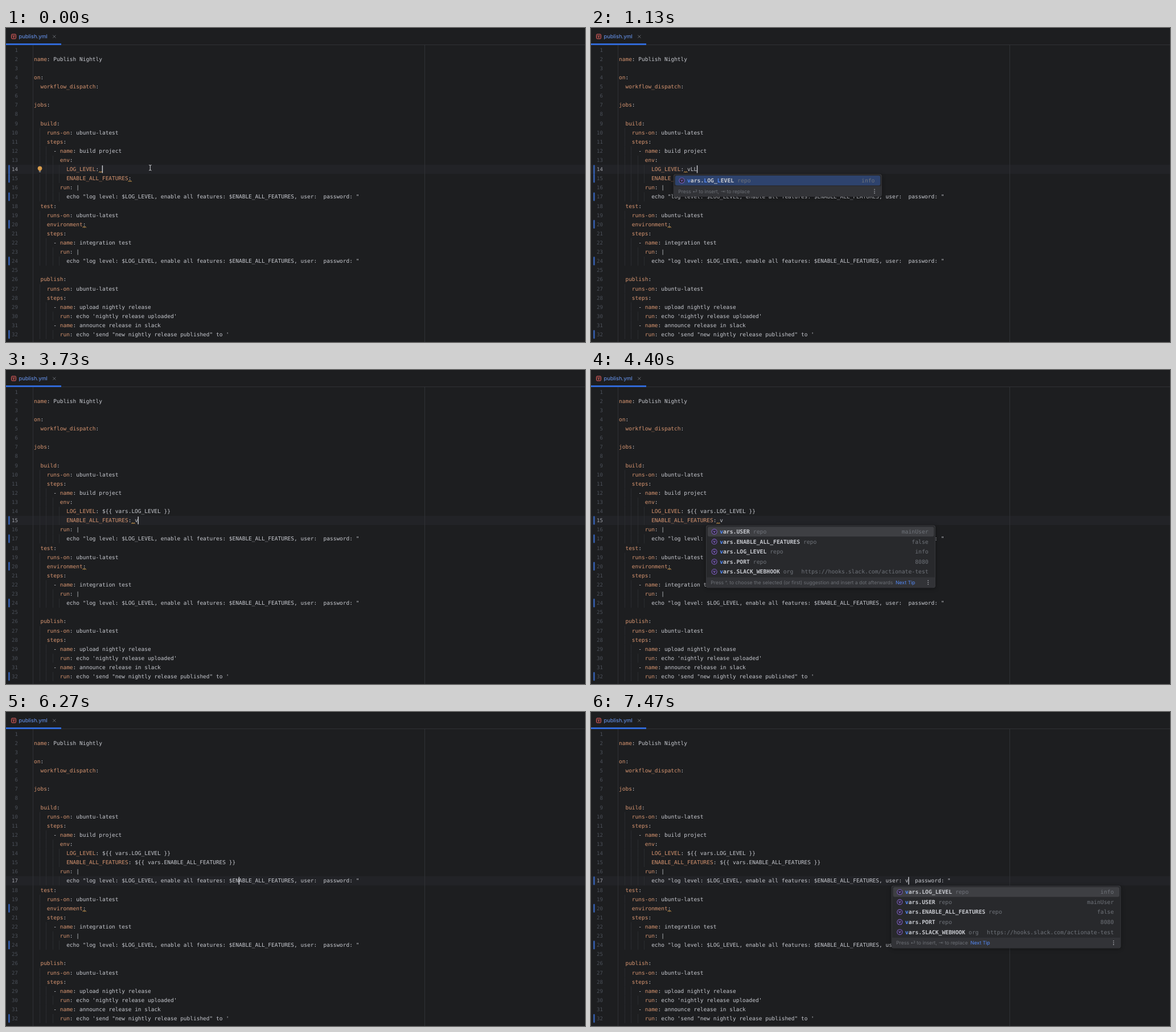
Write an HTML page with a canvas that moves like this. It is 1017 by 551 pixels and loops after 8 s.

```html
<!DOCTYPE html>
<html lang="en">
<head>
<meta charset="utf-8">
<title>publish.yml</title>
<style>
  html, body { margin: 0; width: 100%; height: 100%; overflow: hidden; background: #1d1e20; }
  canvas { display: block; }
</style>
</head>
<body>
<canvas id="stage" width="1017" height="551"></canvas>
<script>
const W = 1017, H = 551, LOOP = 8000;
const ctx = document.getElementById('stage').getContext('2d');
ctx.textRendering = 'geometricPrecision';

const MONO = '"DejaVu Sans Mono", "Noto Sans Mono", monospace';
const SANS = 'Inter, "DejaVu Sans", sans-serif';
const CODE = '9.49px ' + MONO;
const ITEM = '9.75px ' + MONO;
const CW = 5.714, ITEM_CW = 5.87, LINE_H = 16.11, ROW_H = 17.55;

const C = {
  bg: '#1d1e20', row: '#222327', rule: '#2f3135', text: '#c6c8ce', key: '#d6946f',
  num: '#4b5059', numOn: '#a1a3ab', mark: '#345ba6', warn: '#d9a04e', caret: '#ced0d6',
  popup: '#28292c', edge: '#3e3f43', foot: '#323337', dim: '#6f737a', hint: '#6c6f75',
  blue: '#548af7', pick: '#2e436e', purple: '#8f68dd', bulb: '#d99c4c'
};

const colX = col => 49 + col * CW;
const lineY = n => 38.5 + (n - 1) * LINE_H;

// Document text; the edited values come from the state.
const source = s => {
  const echo = user => '          echo "log level: $LOG_LEVEL, enable all features: ' +
    '$ENABLE_ALL_FEATURES, user:' + user + '  password: "';
  return [
    '', 'name: Publish Nightly', '', 'on:', '  workflow_dispatch:', '', 'jobs:', '',
    '  build:',
    '    runs-on: ubuntu-latest',
    '    steps:',
    '      - name: build project',
    '        env:',
    '          LOG_LEVEL:' + s.level,
    '          ENABLE_ALL_FEATURES:' + s.features,
    '        run: |',
    echo(s.user),
    '  test:',
    '    runs-on: ubuntu-latest',
    '    environment:',
    '    steps:',
    '      - name: integration test',
    '        run: |',
    echo(''),
    '',
    '  publish:',
    '    runs-on: ubuntu-latest',
    '    steps:',
    '      - name: upload nightly release',
    "        run: echo 'nightly release uploaded'",
    '      - name: announce release in slack',
    "        run: echo 'send \"new nightly release published\" to '"
  ];
};

const vars = {
  USER: ['repo', 'mainUser'],
  ENABLE_ALL_FEATURES: ['repo', 'false'],
  LOG_LEVEL: ['repo', 'info'],
  PORT: ['repo', '8080'],
  SLACK_WEBHOOK: ['org', 'https://hooks.slack.com/actionate-test']
};
const ALL = Object.keys(vars);
const RECENT = ['LOG_LEVEL', ...ALL.filter(n => n !== 'LOG_LEVEL')];
const INSERT = 'Press ⏎ to insert, ⇥ to replace';
const DOT = 'Press ^. to choose the selected (or first) suggestion and insert a dot afterwards';

const popup = (line, col, typed, names, more) =>
  ({ line, col, typed, names, hint: INSERT, tip: true, width: 403, ...more });
const first = { tip: false, width: 366, pick: C.pick };

// Each step changes part of the state and lasts until the next one.
const steps = [
  [0, { line: 14, col: 21, caret: true, level: ' ', features: '', user: '', warn14: 20, warn15: 29,
        bulb: true, mouse: true, popup: null, marks: [14, 15, 17, 20, 24, 32] }],
  [100, { level: ' v', col: 22, bulb: false, mouse: false, popup: popup(14, 21, 'v', ALL, first) }],
  [900, { level: ' vL', col: 23 }],
  [930, { popup: popup(14, 21, 'vL', ['LOG_LEVEL'], first) }],
  [1130, { level: ' vLL', col: 24, popup: popup(14, 21, 'vLL', ['LOG_LEVEL'], first) }],
  [1500, { level: ' ${{ vars.LOG_LEVEL }}', col: 42, popup: null, marks: [15, 17, 20, 24, 32] }],
  [1800, { warn14: 0 }],
  [2330, { bulb: true }],
  [2400, { caret: false }],
  [2670, { line: 15, col: 30, caret: true, bulb: false }],
  [3130, { features: ' ', col: 31 }],
  [3470, { warn15: 30 }],
  [3730, { features: ' v', col: 32 }],
  [3770, { popup: popup(15, 31, 'v', ALL, { hint: DOT }) }],
  [4400, { caret: false }],
  [4670, { features: ' v.', col: 33, caret: true }],
  [4700, { popup: popup(15, 31, 'v.', ALL) }],
  [5000, { features: ' v.E', col: 34 }],
  [5070, { popup: popup(15, 31, 'v.E', ['ENABLE_ALL_FEATURES']) }],
  [5370, { features: ' ${{ vars.ENABLE_ALL_FEATURES }}', col: 62, popup: null }],
  [5400, { marks: [17, 20, 24, 32] }],
  [5700, { warn15: 0 }],
  [6000, { line: 16, col: 14 }],
  [6070, { line: 17, col: 62, marks: [20, 24, 32] }],
  [6270, { col: 63 }],
  [6600, { marks: [17, 20, 24, 32] }],
  [6870, { col: 86 }],
  [6900, { col: 87 }],
  [7070, { user: ' ', col: 88 }],
  [7470, { user: ' v', col: 89, popup: popup(17, 88, 'v', RECENT) }]
];

function stateAt(t) {
  const s = Object.assign({}, ...steps.filter(([at]) => at <= t).map(step => step[1]));
  // Held arrow key: the caret runs to the right.
  if (t >= 6400 && t < 6870) {
    const held = Math.min(400, Math.floor((t - 6400) / 33.3 + 0.01) * 33.4);
    s.col = 64 + Math.round(held / 400 * 21);
  }
  return s;
}

function rect(x, y, w, h, color) {
  ctx.fillStyle = color;
  ctx.fillRect(x, y, w, h);
}

function round(x, y, w, h, r, color) {
  ctx.beginPath();
  ctx.roundRect(x, y, w, h, r);
  ctx.fillStyle = color;
  ctx.fill();
}

function path(points, color, width = 1) {
  ctx.beginPath();
  points.forEach(([x, y]) => ctx.lineTo(x, y));
  ctx.strokeStyle = color;
  ctx.lineWidth = width;
  ctx.stroke();
}

function disc(x, y, r, color) {
  ctx.beginPath();
  ctx.arc(x, y, r, 0, Math.PI * 2);
  ctx.fillStyle = color;
  ctx.fill();
}

function text(str, x, y, color, font, align = 'left') {
  ctx.font = font;
  ctx.textAlign = align;
  ctx.fillStyle = color;
  ctx.fillText(str, x, y);
}

function drawTab() {
  rect(0, 0, W, 1, '#17181a');
  rect(0, 29, W, 1, C.rule);
  rect(0, 27, 97, 3, '#3069d6');
  ctx.beginPath();
  ctx.roundRect(9.5, 10.9, 8, 8, 1.5);
  ctx.fillStyle = '#402929';
  ctx.fill();
  ctx.strokeStyle = '#db5c5c';
  ctx.lineWidth = 1;
  ctx.stroke();
  path([[11.7, 12.8], [13.5, 15.2], [15.3, 12.8]], '#db5c5c');
  path([[13.5, 15.2], [13.5, 17.2]], '#db5c5c');
  text('publish.yml', 22.5, 18.2, '#6b9bfa', '9.35px ' + SANS);
  path([[82.3, 12.5], [87.3, 17.5]], C.dim, 0.9);
  path([[87.3, 12.5], [82.3, 17.5]], C.dim, 0.9);
}

function drawCode(line, n) {
  const y = lineY(n), base = y + 3.2;
  const indent = line.search(/\S/);
  for (let c = 2; c < indent; c += 2) rect(Math.round(colX(c) - 1.4), y - LINE_H / 2, 1, LINE_H, '#2a2c2f');
  const [, lead, key, rest] = line.match(/^(\s*(?:- )?)([\w-]+(?=:))?(.*)$/);
  const put = (str, col, color) => {
    for (const m of str.matchAll(/\S+/g)) text(m[0], colX(col + m.index), base, color, CODE);
  };
  put(lead, 0, C.text);
  if (key) put(key, lead.length, C.key);
  put(rest, lead.length + (key || '').length, C.text);
}

function squiggle(n, col) {
  const y = lineY(n) + 4.8, pts = [];
  for (let i = 0; i <= 4; i++) pts.push([colX(col) + i * 1.5, y + (i % 2 ? -1 : 1)]);
  path(pts, C.warn, 1);
}

function drawMarks(marks) {
  marks.forEach(n => {
    const joined = marks.includes(n + 1), after = marks.includes(n - 1);
    const top = after ? 0 : 1.5, end = joined ? 0 : 1.5;
    round(4, lineY(n) - 7.8, 2.8, LINE_H - (joined ? 0 : 0.8), [top, top, end, end], C.mark);
  });
}

function drawBulb(y) {
  disc(59.5, y - 1.6, 3.8, C.bulb);
  rect(57.7, y + 1.5, 3.6, 1.4, C.bulb);
  rect(57.9, y + 3.7, 3.2, 1.2, '#a5a7ad');
}

function drawMouse(x, y) {
  const bar = '#d5d6da';
  path([[x, y - 4.2], [x, y + 4.2]], bar);
  for (const d of [-1, 1]) {
    path([[x - 2.2, y + d * 4.9], [x, y + d * 4], [x + 2.2, y + d * 4.9]], bar);
  }
}

function drawItem(name, p, x, right, y) {
  const label = 'vars.' + name, [scope, value] = vars[name];
  const icon = x - 9.5;
  disc(icon, y, 5, C.purple);
  disc(icon, y, 4.1, '#2b2835');
  path([[icon - 1.6, y - 1.8], [icon, y + 1.8], [icon + 1.6, y - 1.8]], C.purple);

  // Typed letters light up in order.
  let hit = 0;
  [...label].forEach((ch, i) => {
    const on = ch === p.typed[hit];
    if (on) hit++;
    text(ch, x + i * ITEM_CW, y + 3.4, on ? C.blue : C.text, 'bold ' + ITEM);
  });
  const after = x + (label.length + 1) * ITEM_CW;
  text(scope, after, y + 3.4, C.dim, ITEM);
  const room = Math.floor((right - after) / ITEM_CW) - scope.length - 2;
  const shown = value.length > room ? value.slice(0, room - 1) + '…' : value;
  text(shown, right, y + 3.4, C.dim, ITEM, 'right');
}

function drawPopup(p) {
  const x = colX(p.col), left = x - 24.2, top = lineY(p.line) + 8.5;
  const rowY = top + 11.2, footY = rowY + (p.names.length - 1) * ROW_H + 18.8;
  const h = footY + 9.6 - top, right = left + p.width;

  ctx.save();
  ctx.shadowColor = 'rgba(0,0,0,.4)';
  ctx.shadowBlur = 7;
  ctx.shadowOffsetY = 1;
  round(left, top, p.width, h, 4, C.edge);
  ctx.restore();
  round(left + 0.8, top + 0.8, p.width - 1.6, h - 1.6, 3.5, C.popup);
  round(left + 0.8, footY - 9, p.width - 1.6, 17.8, [0, 0, 3.5, 3.5], C.foot);
  round(left + 3, rowY - 8.6, p.width - 5.6, 17.2, 3, p.pick || C.edge);
  p.names.forEach((name, i) => drawItem(name, p, x, right - 12.3, rowY + i * ROW_H));

  const font = '8.62px ' + SANS;
  text(p.hint, left + 8.4, footY + 3.1, C.hint, font);
  if (p.tip) text('Next Tip', left + 13 + ctx.measureText(p.hint).width, footY + 3.1, C.blue, font);
  for (const d of [-3.2, 0, 3.2]) disc(right - 12.8, footY + d, 0.8, C.text);
}

function draw(t) {
  const s = stateAt(t), y = lineY(s.line);
  rect(0, 0, W, H, C.bg);
  rect(0, y - LINE_H / 2, W, LINE_H, C.row);
  rect(47, 30, 1, H, C.rule);
  rect(735, 30, 1, H, C.rule);
  drawTab();
  drawMarks(s.marks);
  source(s).forEach((line, i) => {
    const n = i + 1;
    text(n, 20.8, lineY(n) + 3.2, n === s.line ? C.numOn : C.num, '9px ' + MONO, 'right');
    drawCode(line, n);
  });
  if (s.warn14) squiggle(14, s.warn14);
  if (s.warn15) squiggle(15, s.warn15);
  squiggle(20, 15);
  if (s.bulb) drawBulb(y);
  if (s.caret) rect(colX(s.col) - 0.3, y - 6.8, 1.4, 13.4, C.caret);
  if (s.mouse) drawMouse(253.3, 245.2);
  if (s.popup) drawPopup(s.popup);
}

const start = performance.now();
function frame() {
  draw((performance.now() - start) % LOOP);
  requestAnimationFrame(frame);
}
frame();
</script>
</body>
</html>
```
